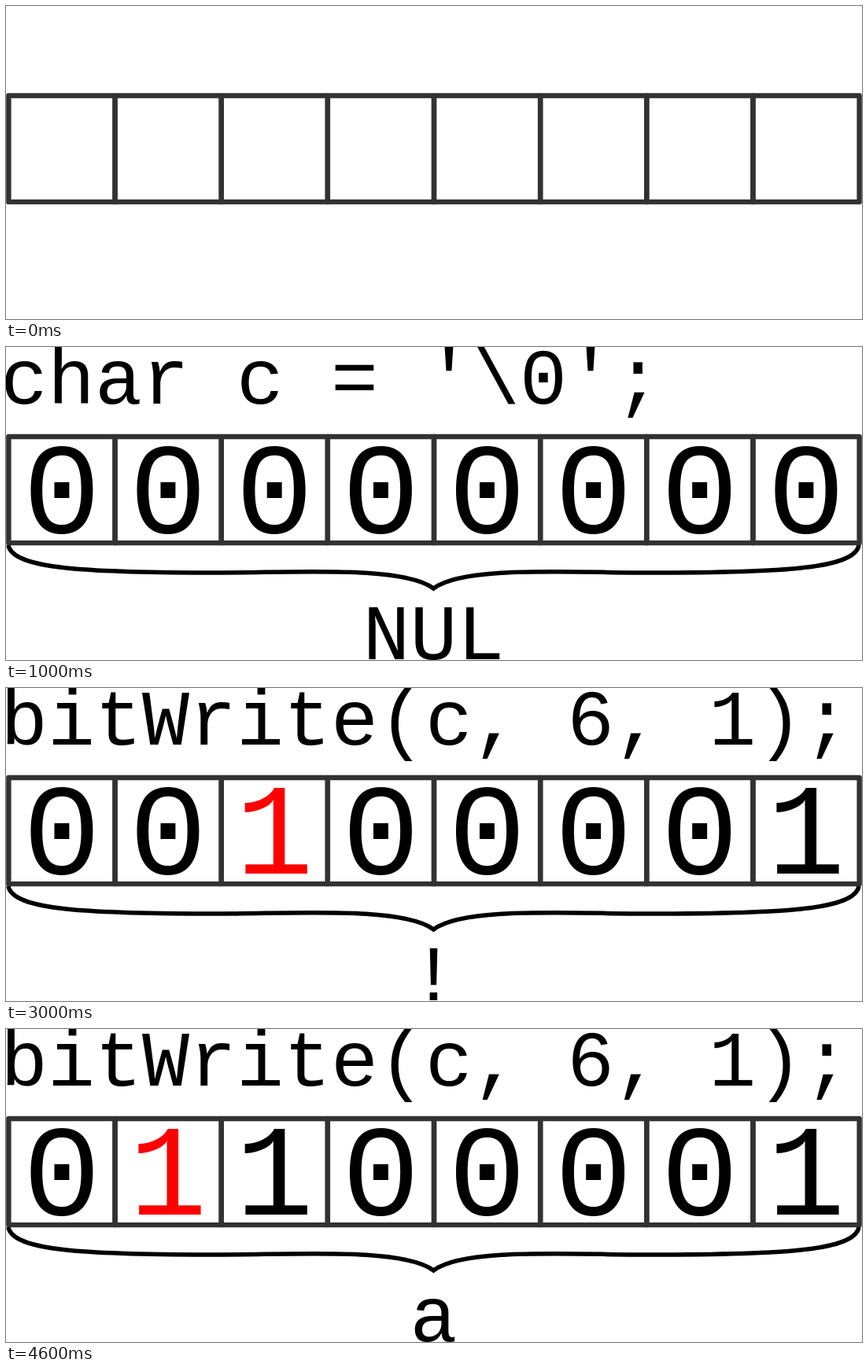
These frames come from a looping animation (1088x398 px, 5 s). An HTML page:

```html
<!DOCTYPE html>
<html lang="en">
<head>
<meta charset="utf-8">
<title>Writing bits of a char</title>
<style>
html, body { margin: 0; width: 100%; height: 100%; overflow: hidden; background: #fff; }
svg { display: block; width: 1088px; height: 398px; }
text { font: 100px "Liberation Mono", "DejaVu Sans Mono", monospace; }
#bits text { font-size: 165px; }
#bits text, #label { text-anchor: middle; }
</style>
</head>
<body>
<svg viewBox="0 0 1088 398">
  <text id="code" x="-7" y="72"></text>
  <g id="grid" fill="none" stroke="#323232" stroke-width="6.4" stroke-linejoin="round"></g>
  <g id="bits"></g>
  <path id="brace" fill="none" stroke="#000" stroke-width="5.5"
    d="M3 252C8 282 100 287 270 287C370 287 505 278 543.5 307C582 278 717 287 817 287C987 287 1079 282 1084 252"/>
  <text id="label" x="543.5" y="396.5"></text>
</svg>
<script>
const PITCH = 135.15, LEFT = 3.4, STEP = 1000;

// Each step: code line, bits, index of the bit just written, character
const steps = [
  ["", "", -1, ""],
  ["char c = '\\0';", "00000000", -1, "NUL"],
  ["bitWrite(c, 0, 1);", "00000001", 7, "SOH"],
  ["bitWrite(c, 6, 1);", "00100001", 2, "!"],
  ["bitWrite(c, 6, 1);", "01100001", 1, "a"]
];

const $ = id => document.getElementById(id);

function add(parent, tag, attrs) {
  const el = document.createElementNS("http://www.w3.org/2000/svg", tag);
  for (const key in attrs) el.setAttribute(key, attrs[key]);
  return parent.appendChild(el);
}

const digits = Array.from({ length: 8 }, (_, i) => {
  const x = LEFT + i * PITCH;
  add($("grid"), "rect", { x, y: 114, width: PITCH, height: PITCH });
  return add($("bits"), "text", { x: x + PITCH / 2, y: 236 });
});

let shown = -1;

function draw(now) {
  const n = Math.floor(now / STEP) % steps.length;
  if (n !== shown) {
    const [code, bits, written, label] = steps[shown = n];
    $("code").textContent = code;
    $("label").textContent = label;
    $("brace").style.display = bits ? "" : "none";
    digits.forEach((digit, i) => {
      digit.textContent = bits[i] || "";
      digit.style.fill = i === written ? "#f00" : "#000";
    });
  }
  requestAnimationFrame(draw);
}

draw(performance.now());
</script>
</body>
</html>
```
